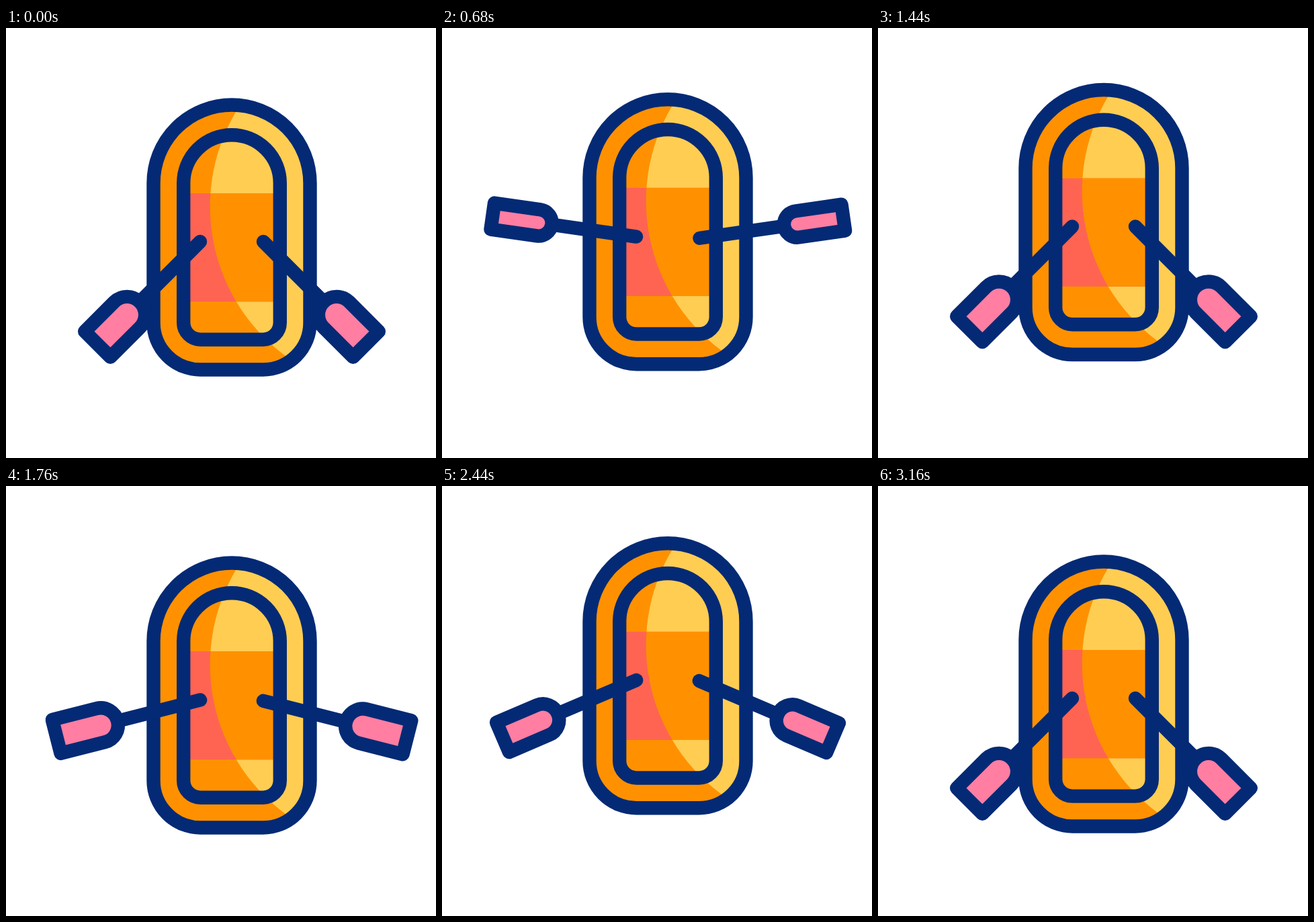
Animation of 640x640 px, one loop 3.2 s. Source, as an HTML page:

```html
<!DOCTYPE html>
<html lang="en">
<head>
<meta charset="utf-8">
<title>Rowing raft</title>
<style>
  html, body { margin: 0; width: 100%; height: 100%; overflow: hidden; background: #fff; }
  svg { display: block; width: 100%; height: 100%; }
  .line { stroke: #042a75; stroke-width: 20.4; stroke-linecap: round; stroke-linejoin: round; }
</style>
</head>
<body>
<svg viewBox="0 0 640 640">
  <defs>
    <path id="hull" d="M219.5 231a116.5 116.5 0 0 1 233 0V438.5a70 70 0 0 1-70 70H289.5a70 70 0 0 1-70-70Z"/>
    <path id="well" d="M264.2 231a71.8 71.8 0 0 1 143.6 0V438.5a25.2 25.2 0 0 1-25.2 25.2H289.4a25.2 25.2 0 0 1-25.2-25.2Z"/>
    <clipPath id="hullClip"><use href="#hull"/></clipPath>
    <clipPath id="bandClip"><rect x="264" y="246" width="144" height="161.3"/></clipPath>
  </defs>
  <g id="raft">
    <g clip-path="url(#hullClip)">
      <rect x="200" y="100" width="280" height="420" fill="#ff9100"/>
      <circle cx="580.7" cy="265.5" r="277" fill="#ffcd52"/>
    </g>
    <g clip-path="url(#bandClip)">
      <rect x="264" y="246" width="144" height="162" fill="#ff6452"/>
      <circle cx="580.7" cy="265.5" r="277" fill="#ff9100"/>
    </g>
    <use href="#hull" class="line" fill="none"/>
    <use href="#well" class="line" fill="none"/>
    <g class="oar"><path class="line shaft" d="M0 0H127"/><path class="line blade" fill="#ff7ea2"/></g>
    <g transform="translate(672) scale(-1 1)">
      <g class="oar"><path class="line shaft" d="M0 0H127"/><path class="line blade" fill="#ff7ea2"/></g>
    </g>
  </g>
</svg>
<script>
const STROKE = 1600;      // one row of the oars, ms
const FRAME = 40;
const LIFT_END = 480, PULL_END = 1040;
const PIVOTS = ['386.2 319', '383.8 318.5'];

const raft = document.getElementById('raft');
const oars = [...document.querySelectorAll('.oar')];
const blades = [...document.querySelectorAll('.blade')];

const progress = (t, from, to) => Math.min(1, Math.max(0, (t - from) / (to - from)));
const smooth = p => p * p * (3 - 2 * p);

// Bezier easing with a long settle: control points (.333, 0) and (.2, 1)
function glide(x) {
  let lo = 0, hi = 1;
  for (let i = 0; i < 24; i++) {
    const u = (lo + hi) / 2, v = 1 - u;
    if (v * v * u + 0.6 * v * u * u + u ** 3 < x) lo = u; else hi = u;
  }
  return smooth((lo + hi) / 2);
}

function draw(time) {
  const t = Math.floor(time / FRAME) * FRAME % STROKE;
  const lift = progress(t, 0, LIFT_END);
  const rest = 1 - smooth(progress(t, LIFT_END, PULL_END));
  const rising = t < LIFT_END;

  const turn = 75 * (rising ? 1 - (1 - lift) ** 1.3 : rest);
  const half = 27 - 10.3 * (rising ? lift * lift : rest);
  const end = 216 + 8.7 * Math.sin(Math.PI * progress(t, 0, 600)) ** 2;
  const neck = 127 + half;
  const shape = `M${end} ${-half}H${neck}A${half} ${half} 0 0 0 ${neck} ${half}H${end}Z`;

  oars.forEach((oar, i) => {
    oar.setAttribute('transform', `rotate(${-turn} ${PIVOTS[i]}) translate(383 318) rotate(45)`);
    blades[i].setAttribute('d', shape);
  });

  const y = -37 * (glide(progress(t, 560, 1120)) - smooth(progress(t, 1320, 1600)));
  raft.setAttribute('transform', `translate(0 ${y})`);
}

const start = performance.now();
function tick() {
  draw(performance.now() - start);
  requestAnimationFrame(tick);
}
tick();
</script>
</body>
</html>
```
